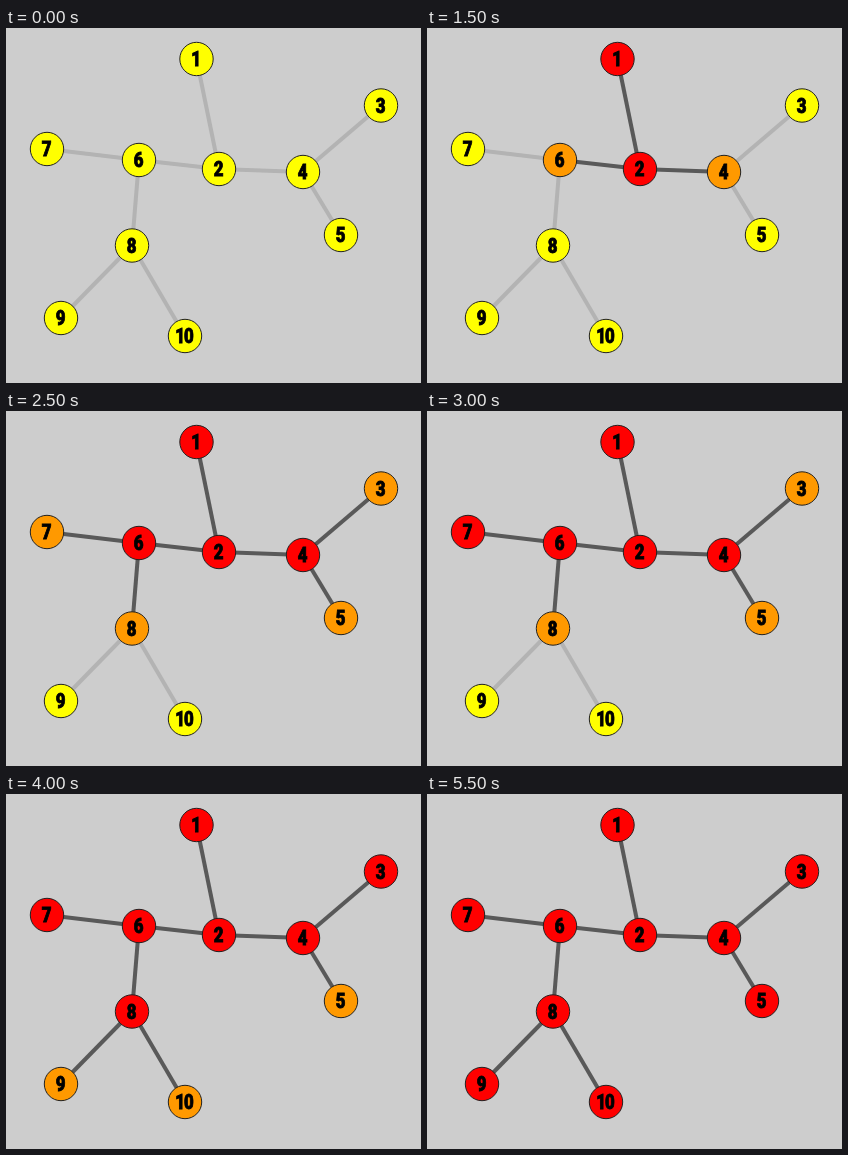
Recreate the animation shown at these times as an HTML page. Size 415 px wide and 355 px high, loop 6000 ms.

```html
<!DOCTYPE html>
<html lang="en">
<head>
<meta charset="utf-8">
<title>Breadth-first search</title>
<style>
  html, body { margin: 0; width: 100%; height: 100%; overflow: hidden; background: #cdcdcd; }
  svg { display: block; width: 100%; height: 100%; }
  line { stroke-width: 4; }
  circle { stroke: #222; stroke-width: 1; }
  text {
    font: 900 20.5px Roboto, "Open Sans", "Liberation Sans", sans-serif;
    letter-spacing: -1px;
    text-anchor: middle;
    stroke: #000;
    stroke-width: .9;
  }
</style>
</head>
<body>
<svg id="stage" viewBox="0 0 415 355"></svg>
<script>
const STEP = 500;
const RADIUS = 16.7;
const COLORS = { idle: '#ffff00', queued: '#ff9900', visited: '#ff0000' };

const node = (id, x, y, ...children) => ({ id, x, y, children });

// Children are listed in the order the search queues them
const root =
  node(1, 190.5, 31,
    node(2, 213, 141,
      node(6, 133, 132,
        node(7, 41, 121),
        node(8, 126, 217.5,
          node(9, 55, 290),
          node(10, 179, 308))),
      node(4, 297, 144,
        node(3, 375, 77.5),
        node(5, 335, 207))));

const stage = document.getElementById('stage');
function add(tag, attrs) {
  const el = document.createElementNS('http://www.w3.org/2000/svg', tag);
  for (const key in attrs) el.setAttribute(key, attrs[key]);
  return stage.appendChild(el);
}

// One visit per step; a visit queues all children
root.queuedAt = 1;
const order = [root];
for (let i = 0; i < order.length; i++) {
  const parent = order[i];
  parent.visitedAt = i + 2;
  for (const child of parent.children) {
    child.parent = parent;
    child.queuedAt = parent.visitedAt;
    order.push(child);
  }
}
const steps = order.length + 2;

for (const n of order.slice(1)) {
  n.edge = add('line', { x1: n.parent.x, y1: n.parent.y, x2: n.x, y2: n.y });
}
for (const n of order) {
  n.disc = add('circle', { cx: n.x, cy: n.y, r: RADIUS });
  add('text', { transform: `translate(${n.x - .9} ${n.y + 7.2}) scale(.82 1)` }).textContent = n.id;
}

function draw(time) {
  const step = Math.floor(time / STEP) % steps;
  for (const n of order) {
    const queued = step >= n.queuedAt;
    const state = step >= n.visitedAt ? 'visited' : queued ? 'queued' : 'idle';
    n.disc.setAttribute('fill', COLORS[state]);
    if (n.edge) n.edge.setAttribute('stroke', queued ? '#595959' : '#b3b3b3');
  }
}

const start = performance.now();
function tick() {
  draw(performance.now() - start);
  requestAnimationFrame(tick);
}
tick();
</script>
</body>
</html>
```
